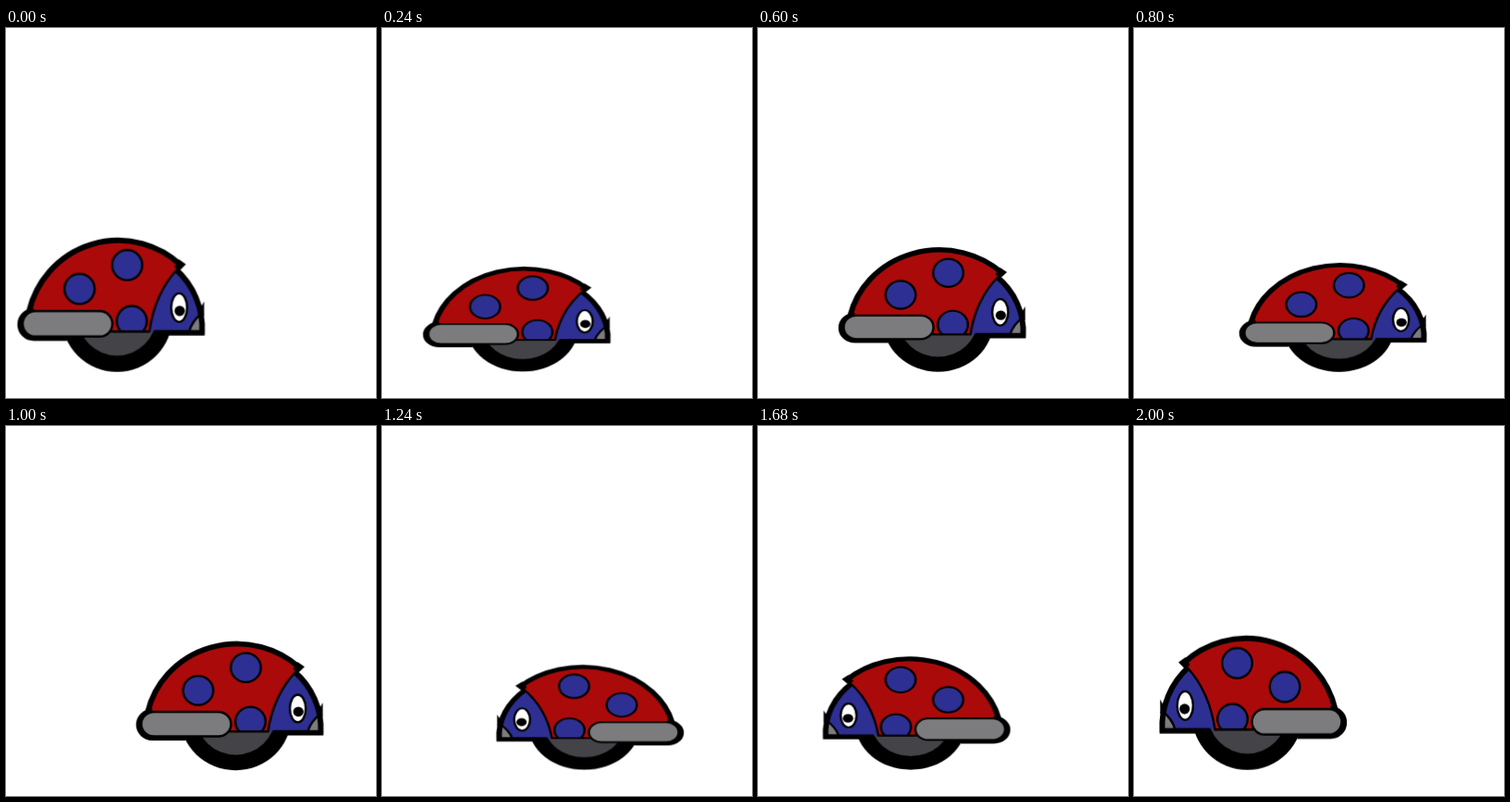
An HTML page for the animation above (2040 ms loop, 400 px wide and 400 px high).

```html
<!DOCTYPE html>
<html lang="en">
<head>
<meta charset="utf-8">
<title>Rolling ladybug</title>
<style>
  html, body { margin: 0; width: 100%; height: 100%; overflow: hidden; background: #fff; }
  svg { display: block; width: 100%; height: 100%; }

  /* 51 poses of 40 ms; the small negative delay keeps each step on its own side of a boundary */
  .bug { animation: roll 2040ms -1ms infinite; animation-timing-function: steps(6); }

  /* Squash against the ground while rolling right, then mirrored while rolling back */
  @keyframes roll {
    0%       { transform: translate(119.5px, 371.7px) scale(1, 1); }
    11.7647% { transform: translate(151.5px, 371.5px) scale(1, .783); }
    23.5294% { transform: translate(183.5px, 371.7px) scale(1, 1); animation-timing-function: step-end; }
    25.4902% { transform: translate(183.5px, 371.7px) scale(1, 1); }
    37.2549% { transform: translate(215.5px, 371.7px) scale(1, .783); }
    49.0196% { transform: translate(247.7px, 372.3px) scale(1, .963); animation-timing-function: step-end; }
    50.9804% { transform: translate(246px, 372.3px) scale(-1, .963); animation-timing-function: steps(5); }
    60.7843% { transform: translate(219.2px, 371.7px) scale(-1, .783); }
    72.549%  { transform: translate(187px, 371.7px) scale(-1, 1); animation-timing-function: step-end; }
    74.5098% { transform: translate(187px, 371.7px) scale(-1, 1); }
    86.2745% { transform: translate(155px, 371.5px) scale(-1, .765); }
    98.0392%, 100% { transform: translate(123px, 371.7px) scale(-1, 1); animation-timing-function: step-end; }
  }

  .thin { stroke: #000; stroke-width: 2.4; }
  .thick { fill: none; stroke: #000; stroke-width: 6; }
  .red { fill: #ab0a0a; }
  .blue { fill: #2e2f92; }
  .gray { fill: #7c7c7e; }
</style>
</head>
<body>
<svg viewBox="0 0 400 400">
  <defs>
    <clipPath id="shell"><rect x="0" y="200" width="240" height="128"/></clipPath>
  </defs>
  <g class="bug">
    <g transform="translate(-119.5 -371.7)">
      <!-- wheel -->
      <circle cx="120" cy="311.7" r="60"/>
      <circle cx="120" cy="311.7" r="42.5" fill="#444347"/>

      <!-- head -->
      <path class="blue" d="M184 261A86 86 0 0 1 212 328H155Q161 287 184 261Z"/>
      <path class="gray thin" d="M198 328Q201 317 212 308V328Z"/>
      <path class="thick" d="M183 260.3A86 86 0 0 1 212 329.5H160"/>
      <path d="M214.2 295.5V311H208L207.5 308Z"/>
      <ellipse class="thin" cx="187.2" cy="302.2" rx="8.6" ry="15.4" fill="#fff"/>
      <circle cx="187.8" cy="305.8" r="5.6"/>

      <!-- shell -->
      <path class="red" d="M25 306A99 99 0 0 1 190 257L185 261Q161 287 155 328H25Z"/>
      <path class="thin" fill="none" d="M185 261Q161 287 155 328H100"/>
      <g class="blue thin" clip-path="url(#shell)">
        <circle cx="79.5" cy="282" r="16.3"/>
        <circle cx="131" cy="256.3" r="16.3"/>
        <circle cx="136" cy="316.8" r="16.3"/>
      </g>
      <path class="thin" d="M115 328H155"/>
      <path class="thick" d="M25 306A99 99 0 0 1 189 256.2"/>
      <path d="M187 250L194.5 255.5L187 263L182 258Z"/>

      <!-- side bar -->
      <path class="thick" d="M30 305.7A14.7 14.7 0 0 0 30 335.1H66"/>
      <rect class="gray thin" x="18" y="306" width="97" height="27.5" rx="13.7"/>
    </g>
  </g>
</svg>
</body>
</html>
```
